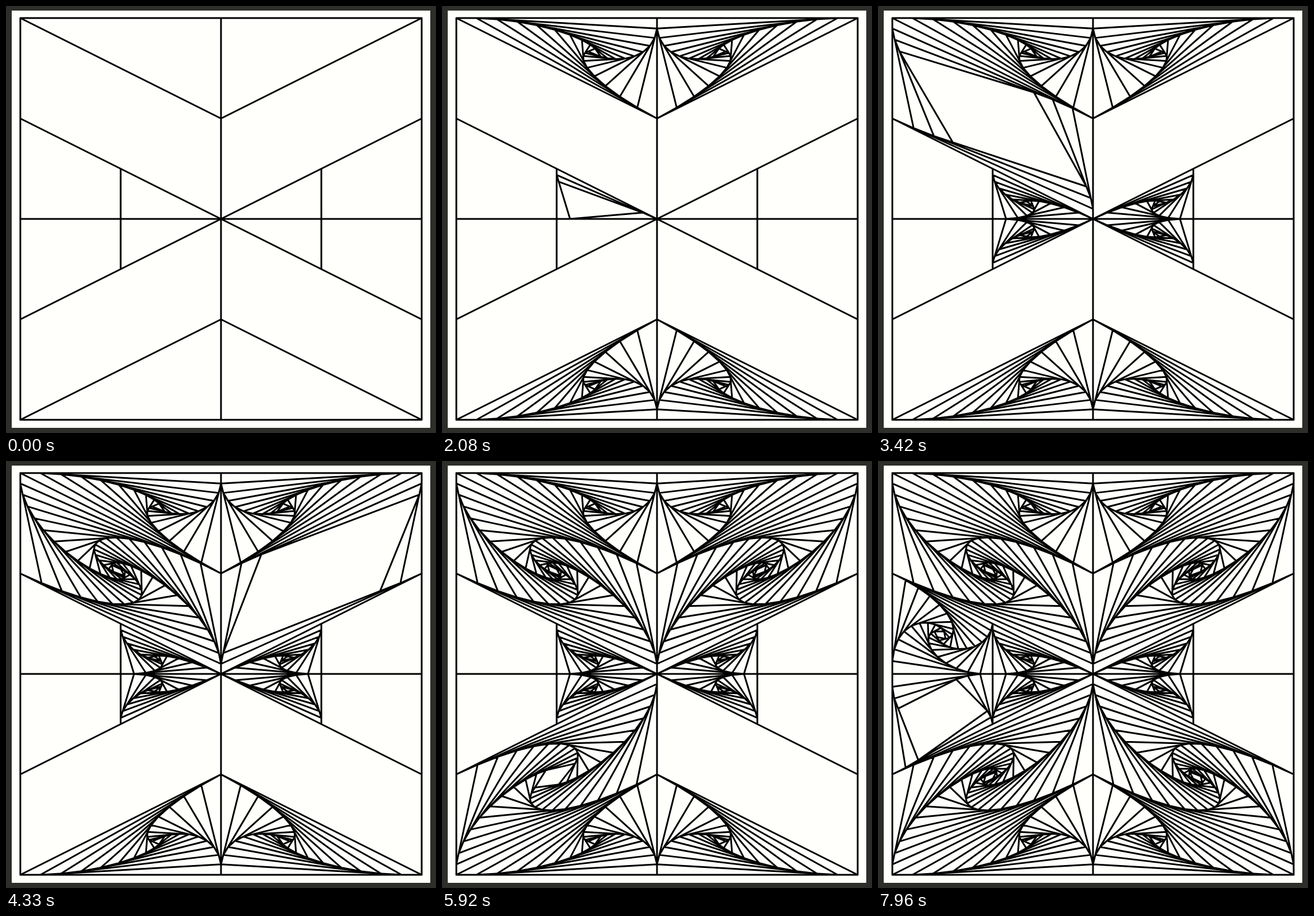
Animation of 750 by 744 pixels, one loop 8000 ms. Source, as an HTML page with a canvas:

```html
<!DOCTYPE html>
<html lang="en">
<head>
<meta charset="utf-8">
<title>Whirl lines</title>
<style>
  html, body { margin: 0; height: 100%; overflow: hidden; background: #2d2d29; }
  canvas { display: block; }
</style>
</head>
<body>
<canvas id="stage" width="750" height="744"></canvas>
<script>
const ctx = document.getElementById('stage').getContext('2d');
const UNIT = 175, CENTER_X = 375, CENTER_Y = 371;
const LOOP = 8000, FPS = 24;
const LINES_PER_TICK = 2.6, FIRST_TICK = 5.07;
const RATIO_GROWTH = 3.2;

// A whirl starts as a polygon. Each new point divides the side drawn one turn
// earlier, and the dividing ratio grows evenly from the first line to the last.
function whirl(corners, ratio, rounds) {
  const sides = corners.length, lines = sides * rounds;
  const points = [...corners];
  for (let i = 0; i < lines; i++) {
    const r = ratio * RATIO_GROWTH ** (i / lines);
    const [[ax, ay], [bx, by]] = points.slice(i, i + 2);
    points.push([ax + (bx - ax) * r, ay + (by - ay) * r]);
  }
  return { corners, lines, trail: points.slice(sides - 1) };
}

// The four mirrored copies of a whirl, row by row or side by side.
function copies(order, corners, ratio, rounds) {
  return [0, 1, 2, 3].map(i => {
    const first = i & 1 ? -1 : 1, second = i & 2 ? -1 : 1;
    const [sx, sy] = order === 'rows' ? [first, second] : [second, first];
    const placed = corners.map(([x, y]) => [CENTER_X + x * sx * UNIT, CENTER_Y + y * sy * UNIT]);
    return whirl(placed, ratio, rounds);
  });
}

// Corners of the upper left copy, in units from the centre.
const whirls = [
  ...copies('rows', [[-2, -2], [0, -2], [0, -1]], 0.1, 9),
  ...copies('sides', [[-1, -0.5], [-1, 0], [0, 0]], 0.125, 6),
  ...copies('rows', [[0, 0], [0, -1], [-2, -2], [-2, -1]], 0.1, 15),
  ...copies('sides', [[-1, 0], [-2, 0], [-2, -1], [-1, -0.5]], 0.125, 10)
];

function tracePath(points) {
  points.forEach(([x, y], i) => i ? ctx.lineTo(x, y) : ctx.moveTo(x, y));
}

function draw(time) {
  ctx.fillStyle = '#2d2d29';
  ctx.fillRect(0, 0, 750, 744);
  ctx.fillStyle = '#fffffc';
  ctx.fillRect(10, 8, 730, 727);

  ctx.lineWidth = 3;
  ctx.lineCap = ctx.lineJoin = 'round';
  ctx.beginPath();
  for (const { corners } of whirls) {
    tracePath(corners);
    ctx.closePath();
  }

  // Ticks are rounded to hundredths of a second.
  const tick = Math.floor((time + 5) * FPS / 1000);
  let left = Math.floor((tick - FIRST_TICK) * LINES_PER_TICK);
  for (const { trail, lines } of whirls) {
    if (left <= 0) break;
    tracePath(trail.slice(0, left + 1));
    left -= lines + 1;   // one beat of rest between whirls
  }
  ctx.stroke();
}

const start = performance.now();
function loop() {
  draw((performance.now() - start) % LOOP);
  requestAnimationFrame(loop);
}
loop();
</script>
</body>
</html>
```
